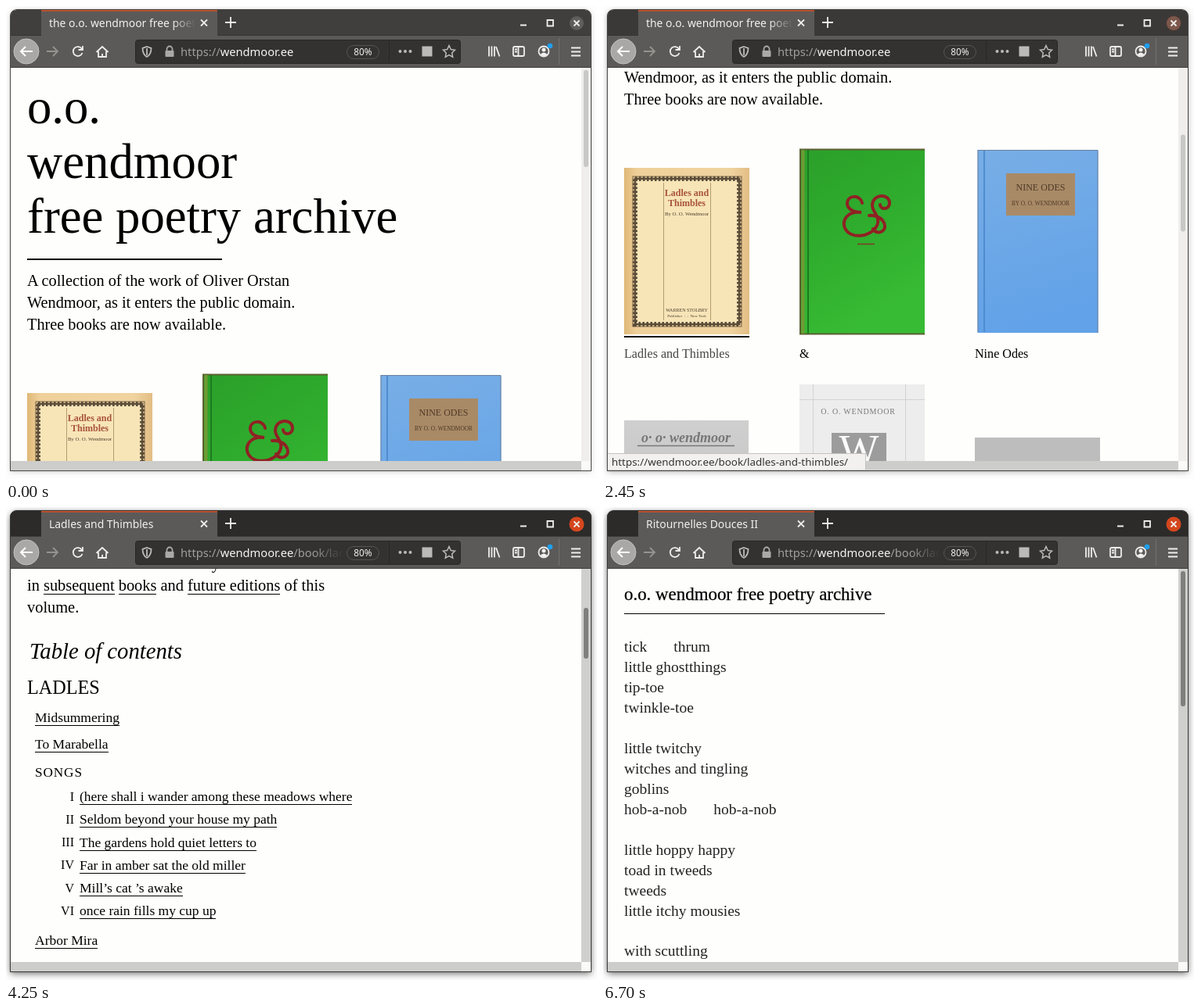
Recreate the animation shown at these times as an HTML page. Size 755x605 px, loop 8 s.

```html
<!DOCTYPE html>
<html lang="en">
<head>
<meta charset="utf-8">
<title>Poetry archive</title>
<style>
html, body { margin: 0; width: 100%; height: 100%; overflow: hidden; background: #fdfdfd; }
div, svg.layer { position: absolute; }
svg.layer { left: 0; top: 0; overflow: visible; }
#shade, #shadeOn { left: 6px; top: 5px; width: 741px; height: 589px; border-radius: 8px 8px 0 0; }
#shade { box-shadow: 0 0 0 1px #4a4a48, 0 1px 6px rgba(0,0,0,.25); }
#shadeOn { box-shadow: 0 0 0 1px #3a3a38, 0 3px 10px rgba(0,0,0,.45); }
#view { left: 6px; top: 79px; width: 729px; height: 503px; overflow: hidden; background: #fefefd; }
.page { left: -6px; top: -79px; font-family: "Liberation Serif", serif; color: #000; }
p { position: absolute; margin: 0; line-height: 0; white-space: pre; }
u { text-decoration: none; border-bottom: 1px solid; }
.rule { left: 27px; background: #000; }
#status { left: 6px; top: 572px; height: 21px; padding: 0 5px; white-space: pre; box-sizing: border-box;
  background: #f2f1ef; color: #333; border: 1px solid #c4c3c1; border-width: 1px 1px 0 0; font: 13.4px/20px "Noto Sans", sans-serif; }
svg text { white-space: pre; }
.ui { font-family: "Noto Sans", sans-serif; fill: #f2f1ef; }
.cover { font-family: "Liberation Serif", serif; text-anchor: middle; }
.icon { fill: none; stroke: #eeedeb; stroke-width: 1.8; }
</style>
</head>
<body>
<div id="shade"></div>
<div id="shadeOn" class="active"></div>

<div id="view">
  <div class="page">
    <svg class="layer cover" width="755" height="1000">
      <defs>
        <linearGradient id="paper"><stop stop-color="#dfb877"/><stop offset=".1" stop-color="#efd09a"/><stop offset=".85" stop-color="#f0d4a0"/><stop offset="1" stop-color="#e2bd85"/></linearGradient>
        <linearGradient id="green" x2=".4" y2="1"><stop stop-color="#2b9f2a"/><stop offset=".5" stop-color="#2fac2d"/><stop offset="1" stop-color="#38bb34"/></linearGradient>
        <linearGradient id="blue" x2=".2" y2="1"><stop stop-color="#78aee6"/><stop offset="1" stop-color="#62a2e8"/></linearGradient>
        <linearGradient id="grey" x2="0" y2="1"><stop stop-color="#cfcfcf"/><stop offset="1" stop-color="#bcbcbc"/></linearGradient>
      </defs>
      <rect x="27" y="495" width="160" height="213" fill="url(#paper)"/>
      <rect x="41" y="509" width="133" height="186" fill="#f7e5b8"/>
      <g fill="none" stroke="#5a4c38">
        <rect x="41" y="509" width="133" height="186" stroke-width="6" stroke-dasharray="2.5 2.5"/>
        <rect x="41" y="509" width="133" height="186" stroke-width="2.5"/>
        <rect x="38" y="506" width="139" height="192" stroke-width=".8"/>
      </g>
      <path d="M77.5 514V690M137.5 514V690" stroke="#b39c70"/>
      <g fill="#a9533d" font-size="12" font-weight="bold"><text x="107" y="531">Ladles and</text><text x="107" y="544">Thimbles</text></g>
      <g fill="#4b3c2a"><text x="107" y="556" font-size="6.8">By O. O. Wendmoor</text>
      <text x="107" y="679" font-size="6">WARREN STOLBRY</text><text x="107" y="685.5" font-size="5">Publisher  :  :  New York</text></g>

      <rect x="251" y="471" width="160" height="237" fill="url(#green)"/>
      <path d="M252 471V708M251 471.5H411M251 707.5H411" stroke="#5b6030" stroke-width="2"/>
      <path d="M255.5 472V707" stroke="#6f9a35" stroke-width="4"/><path d="M262 472V707" stroke="#1d7a20" stroke-width="2"/>
      <g fill="none" stroke="#8f2224" stroke-width="4" stroke-linecap="round">
        <path d="M331 540C329 529 312 529 312 541Q313 551 330 552C312 550 305 562 309 572C315 586 341 585 350 569C355 557 344 552 344 543C344 528 366 527 366 540C366 549 354 549 354 542M340 556Q350 555 357 562C367 575 350 583 345 573"/>
      </g>
      <path d="M325 592.5H347" stroke="#7c3a22" stroke-width="1.5"/>

      <rect x="478.5" y="472" width="154" height="234" fill="url(#blue)"/>
      <path d="M479 472V705M632 473V706M479 472.5H632" stroke="#6a7f9c"/><path d="M487 473V705" stroke="#4f8ccf" stroke-width="2"/>
      <rect x="515" y="502" width="88" height="54" fill="#a98a66"/>
      <g fill="#4e3a28"><text x="559" y="524" font-size="12">NINE ODES</text><text x="559" y="543" font-size="7.4">BY O. O. WENDMOOR</text></g>

      <rect x="27" y="818" width="159" height="200" fill="url(#grey)"/>
      <text x="106" y="846" font-size="18" font-style="italic" font-weight="bold" fill="#777">o· o· wendmoor</text>
      <path d="M44 850.5H168" stroke="#777" stroke-width="1.5"/>
      <rect x="251" y="772" width="160" height="240" fill="#ededed"/>
      <path d="M268.5 772V1000M386.5 772V1000M251 791.5H411" stroke="#d2d2d2"/>
      <text x="326" y="810" font-size="10" letter-spacing=".8" fill="#777">O. O. WENDMOOR</text>
      <rect x="292" y="834" width="70" height="90" fill="#9c9c9c"/><text x="327" y="874" font-size="54" fill="#fafafa">W</text>
      <rect x="475" y="840" width="160" height="170" fill="#bdbdbd"/>
    </svg>
    <div class="rule" style="top:323px;width:249px;height:2px"></div>
    <div id="coverLine" class="rule" style="top:710px;width:160px;height:2px"></div>
  </div>
  <div class="page"><div class="rule" style="top:136px;width:333px;height:1px"></div></div>
  <div class="page"><div class="rule" style="top:136px;width:333px;height:1px"></div></div>
</div>

<svg class="layer ui" width="755" height="605">
  <defs>
    <linearGradient id="tabFade"><stop stop-color="#5b5a58" stop-opacity="0"/><stop offset="1" stop-color="#5b5a58"/></linearGradient>
    <linearGradient id="urlFade"><stop stop-color="#333231" stop-opacity="0"/><stop offset="1" stop-color="#333231"/></linearGradient>
  </defs>
  <path d="M6 38V12Q6 5 14 5H739Q747 5 747 12V38Z" fill="#403f3d"/>
  <path class="active" d="M6 38V12Q6 5 14 5H739Q747 5 747 12V38Z" fill="#2c2b29"/>
  <path d="M45 5H270V38H747V78H6V38H45Z" fill="#5b5a58"/>
  <path d="M6 78.5H747" stroke="#3b3a38"/>
  <path d="M270 37.5H747M6 37.5H45" stroke="#353432"/>
  <path d="M45 6H270" stroke="#b9522f" stroke-width="2"/>
  <svg x="55" width="186" height="40"><text id="tab" y="27" font-size="13.9"></text></svg>
  <rect id="tabShade" x="212" y="10" width="30" height="26" fill="url(#tabFade)"/>
  <path class="icon" d="M249 17.5l8 8m0-8l-8 8M280 21h14M287 14v14"/>
  <path class="icon" stroke-width="1.4" d="M657 24.5h8M691.5 18h7.5v7.5h-7.5z"/>
  <circle cx="729" cy="22" r="9" fill="#5f5e5c"/><circle class="active" cx="729" cy="22" r="9.5" fill="#d5471d"/>
  <path class="icon" d="M725.5 18.5l7 7m0-7l-7 7"/>

  <circle cx="26" cy="58" r="16" fill="#a9a8a6" stroke="#c4c3c1"/>
  <path class="icon" d="M34 58H19m6-6l-6 6l6 6" style="stroke:#fff;stroke-width:2"/>
  <path class="icon" d="M52 58h14m-6-6l6 6l-6 6" style="stroke:#94938f"/>
  <path class="icon" d="M97 55a6 6 0 1 0 .5 5M98 51v5h-5.5"/>
  <path class="icon" d="M115.5 59l7.5-7l7.5 7M118 58v7h10v-7M123 65v-4"/>
  <rect x="165.5" y="43.5" width="415" height="30" rx="3" fill="#333231" stroke="#282726"/>
  <path class="icon" d="M180 52l5.5 2q0 8-5.5 11q-5.5-3-5.5-11zM180 54v9" style="stroke:#bbbab8"/>
  <path class="icon" d="M205.5 57v-2a3.5 3.5 0 0 1 7 0v2" style="stroke:#aaa9a7"/><rect x="203.5" y="57" width="11" height="8" rx="1" fill="#aaa9a7"/>
  <svg x="223" width="206" height="80"><text y="64" font-size="14.7" fill="#a09f9d">https://<tspan fill="#f6f5f3">wendmoor.ee</tspan><tspan id="path"></tspan></text></svg>
  <rect x="392" y="46" width="38" height="25" fill="url(#urlFade)"/>
  <rect x="435.5" y="50.5" width="41" height="17" rx="8.5" fill="#333231" stroke="#555452"/>
  <text x="456" y="63" font-size="11.8" text-anchor="middle">80%</text>
  <path d="M489.5 45V72" stroke="#282726"/>
  <g fill="#bbbab8"><circle cx="503.5" cy="58" r="2"/><circle cx="510" cy="58" r="2"/><circle cx="516.5" cy="58" r="2"/>
  <rect x="531.5" y="51.5" width="13" height="13"/></g>
  <path class="icon" d="M566 50.5l2.3 5l5.2.7l-3.8 3.7l1 5.3l-4.7-2.6l-4.7 2.6l1-5.3l-3.8-3.7l5.2-.7z" style="stroke:#bbbab8;stroke-width:1.5"/>
  <path class="icon" d="M617 51.5v13M620.5 51.5v13M624 51.5v13M626 52l4.5 12.5"/>
  <rect class="icon" x="648" y="52" width="14" height="12" rx="2"/><path class="icon" d="M654.5 52v12M650 55.5h3M650 58.5h3"/>
  <circle class="icon" cx="687" cy="58" r="6.5"/><circle cx="687" cy="56" r="2.5"/><path d="M682.5 62q4.5-5 9 0q-4.5 4-9 0z"/>
  <circle cx="695" cy="51" r="3.3" fill="#1ea0f0"/>
  <path d="M706.5 41V75" stroke="#72716f"/>
  <path class="icon" d="M722 53.5h12M722 58.5h12M722 63.5h12"/>

  <rect id="track" x="735" y="79" width="12" height="503"/>
  <rect id="thumb" x="738" width="6" rx="3"/>
  <rect x="6" y="582" width="729" height="12" fill="#cdcdcb"/>
  <rect x="735" y="582" width="12" height="12" fill="#fafaf9"/>
</svg>
<div id="status"></div>

<script>
const $ = id => document.getElementById(id);
const pages = [...document.querySelectorAll('.page')];
const actives = document.querySelectorAll('.active');

// Put a line of text on page n with its baseline at y.
function put(n, x, y, size, html, style = '') {
  pages[n].insertAdjacentHTML('beforeend',
    `<p style="left:${x}px;top:${y - .3375 * size}px;font-size:${size}px;${style}">${html}</p>`);
  return pages[n].lastChild;
}
const lines = (n, y, step, size, texts, style) =>
  texts.forEach((s, i) => put(n, 27, y + i * step, size, s, style));
const link = (x, y, s) => put(1, x, y, 17.5, `<u>${s}</u>`);
const section = (y, s) => put(1, 37, y, 17.2, s, 'letter-spacing:.9px');
const numbered = (y, texts) => texts.map((s, i) => {
  put(1, 87, y + i * 29.25, 16, ['I', 'II', 'III', 'IV', 'V', 'VI'][i], 'transform:translateX(-100%)');
  return link(94, y + i * 29.25, s);
});

lines(0, 150, 70, 62.7, ['o.o.', 'wendmoor', 'free poetry archive']);
lines(0, 358, 28, 20.3, ['A collection of the work of Oliver Orstan',
  'Wendmoor, as it enters the public domain.', 'Three books are now available.']);
const caption = put(0, 27, 738, 16.1, 'Ladles and Thimbles');
put(0, 251, 738, 16.1, '&amp;');
put(0, 475, 738, 16.1, 'Nine Odes');

for (const n of [1, 2])
  put(n, 27, 120, 22.9, 'o.o. wendmoor free poetry archive', '-webkit-text-stroke:.25px');

put(1, 27, 209, 62.7, 'Ladles and Thimbles');
lines(1, 257, 28, 20.4, ['This 1923 release was Wendmoor’s first book',
  'of verse. It entered the public domain in 2019.']);
lines(1, 324, 28, 20.4, ['The first edition, published by <u>Warren Stolbry</u>,',
  'is reproduced here. Many poems submitted by', 'the author were omitted. They would surface',
  'in <u>subsequent</u> <u>books</u> and <u>future editions</u> of this', 'volume.']);
put(1, 30, 495, 28.7, 'Table of contents', 'font-style:italic');
put(1, 27, 540, 24.2, 'LADLES');
link(37, 576, 'Midsummering');
link(37, 610, 'To Marabella');
section(647, 'SONGS');
numbered(677, ['(here shall i wander among these meadows where', 'Seldom beyond your house my path',
  'The gardens hold quiet letters to', 'Far in amber sat the old miller',
  'Mill’s cat ’s awake', 'once rain fills my cup up']);
link(37, 861, 'Arbor Mira');
section(899, 'RITOURNELLES DOUCES');
const poemLink = numbered(928, ['at Half-', 'tick       thrum', 'Whistling-fox'])[1];
link(207, 1012, 'keeper of marigolds');
link(377, 1036, 'clovers');
section(1079, 'PASTORALE');
numbered(1108, ['i wrote of snow', 'soft ladders gather by', 'my bell']);

lines(2, 186, 25.93, 19.5, ['tick       thrum', 'little ghostthings', 'tip-toe', 'twinkle-toe', '',
  'little twitchy', 'witches and tingling', 'goblins', 'hob-a-nob       hob-a-nob', '',
  'little hoppy happy', 'toad in tweeds', 'tweeds', 'little itchy mousies', '',
  'with scuttling'], 'color:#222');

const titles = ['the o.o. wendmoor free poetry archive', 'Ladles and Thimbles', 'Ritournelles Douces II'];
// Scrollbar thumb per page: height, travel per scrolled pixel.
const thumbs = [[124, .2865], [65, .1562], [173, 0]];
// Scroll gestures per page: start, end, distance.
const scrolls = [
  [[500, 980, 288]],
  [[3600, 3782, 190], [3950, 4000, 2], [4150, 4332, 190], [4450, 4500, 2], [4700, 4950, 192]],
  []
];
const site = 'https://wendmoor.ee/book/ladles-and-thimbles/';

const ramp = (t, a, b) => Math.min(1, Math.max(0, (t - a) / (b - a)));
const smooth = u => u * u * (3 - 2 * u);

function draw(now) {
  const t = Math.floor(now % 8000 / 50) * 50;
  const n = t < 2800 ? 0 : t < 6450 ? 1 : 2;
  const y = Math.round(scrolls[n].reduce((sum, [a, b, d]) => sum + d * smooth(ramp(t, a, b)), 0));
  pages.forEach((page, i) => {
    page.style.display = i === n ? '' : 'none';
    page.style.transform = `translateY(${-y}px)`;
  });

  const focus = ramp(t, 2400, 2600);
  actives.forEach(e => e.style.opacity = focus);
  $('track').setAttribute('fill', focus > .5 ? '#cfcfcd' : '#efeeec');
  $('thumb').setAttribute('fill', focus > .5 ? '#7f7f7d' : '#c8c8c6');
  $('thumb').setAttribute('y', 82 + y * thumbs[n][1]);
  $('thumb').setAttribute('height', thumbs[n][0]);

  $('tab').textContent = titles[n];
  $('tabShade').style.display = n ? 'none' : '';
  $('path').textContent = n ? '/book/ladles-and-thimbles/' : '';

  const hover = t >= 1700;
  $('coverLine').style.display = hover ? '' : 'none';
  caption.style.color = hover ? '#444' : '';
  poemLink.style.color = t >= 5450 ? '#444' : '';

  const late = t > 4000;
  $('status').textContent = late ? site + 'poem/ritournelles-douces-ii/' : site;
  $('status').style.width = late ? '531px' : '330px';
  $('status').style.opacity = late
    ? ramp(t, 5700, 5900) - ramp(t, 6300, 6450)
    : ramp(t, 1800, 1950) - ramp(t, 2650, 2800);
}

const start = performance.now();
(function tick() {
  draw(performance.now() - start);
  requestAnimationFrame(tick);
})();
</script>
</body>
</html>
```
